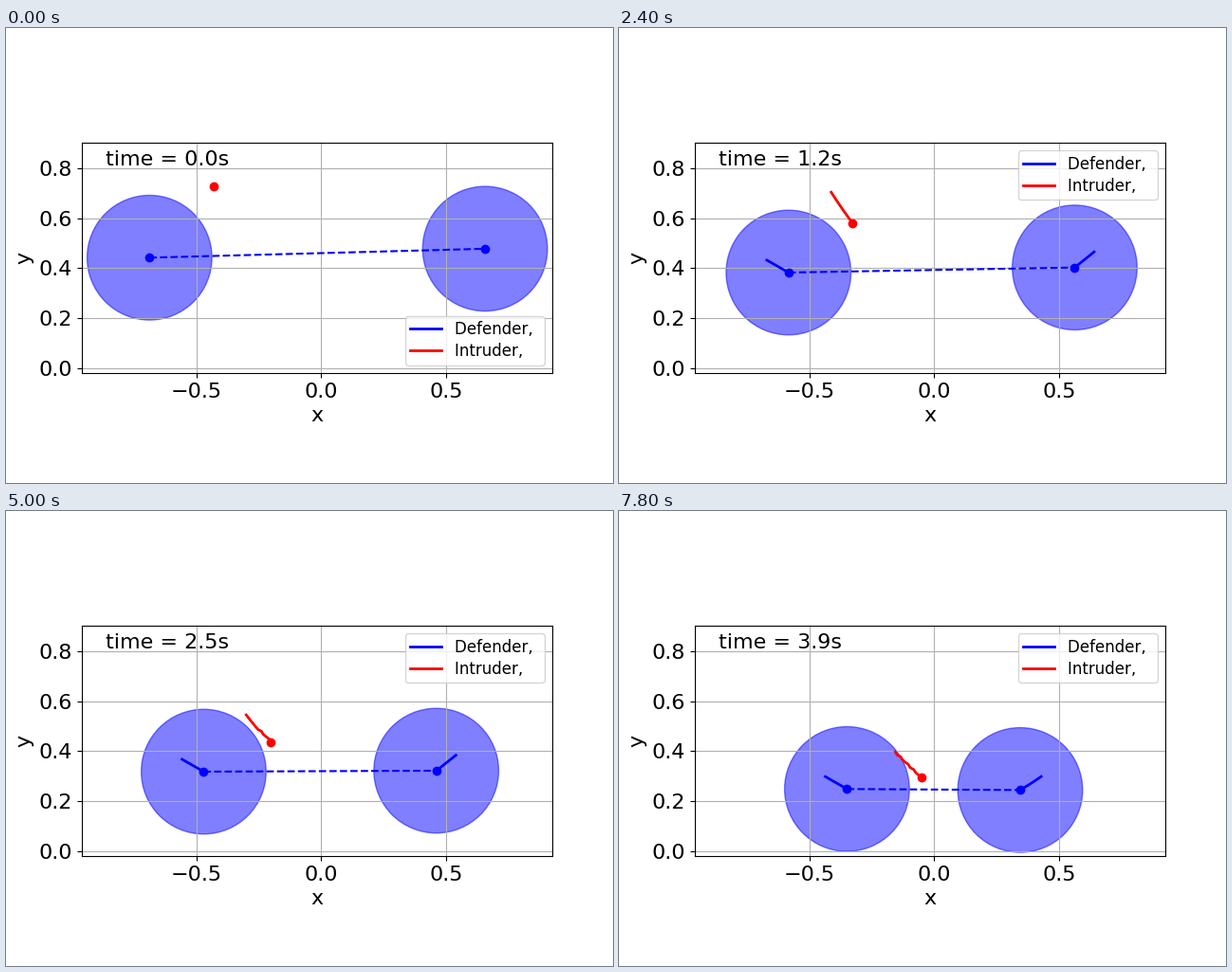
These frames come from a looping animation (640x480 px, 8000 ms). A matplotlib script:

```python
import numpy as np
import matplotlib.pyplot as plt
from matplotlib.animation import FuncAnimation
from matplotlib.lines import Line2D

FRAMES = 40
INTERVAL = 200
DT = 0.1
TAIL = 10
CONTACT = 20
RADIUS = 0.25

plt.rcParams["font.family"] = "DejaVu Sans"


def walk(start, speed, headings):
    """Positions reached from start with constant speed; headings in degrees."""
    a = np.radians(headings)
    steps = speed * DT * np.column_stack([np.cos(a), np.sin(a)])
    return np.vstack([start, start + np.cumsum(steps, axis=0)])


k = np.arange(FRAMES - 1)
late = np.maximum(0, k - CONTACT)
left = walk((-0.688, 0.4423), 0.1, np.full(len(k), -29.8))
right = walk((0.656, 0.478), 0.1, 180 + 38.8 - 0.45 * late)

# The intruder bends smoothly, then chatters along the edge of the disc
chatter = 44.2 - 18 * np.cos(2.5 * late)
intruder = walk((-0.429, 0.7302), 0.15,
                -np.where(k < CONTACT, 58 - 0.4 * k, chatter))

fig, ax = plt.subplots(figsize=(6.4, 4.8), dpi=100)
ax.set_aspect("equal")
ax.set_xlim(-0.959, 0.9255)
ax.set_ylim(-0.02, 0.9037)
ax.set_xticks([-0.5, 0, 0.5])
ax.set_yticks([0, 0.2, 0.4, 0.6, 0.8])
ax.tick_params(labelsize=16)
ax.set_xlabel("x", fontsize=16)
ax.set_ylabel("y", fontsize=16)
ax.grid(True)

agents = []
for path, color in ((left, "blue"), (right, "blue"), (intruder, "red")):
    trail, = ax.plot([], [], color=color, lw=2)
    dot, = ax.plot([], [], "o", color=color, ms=6)
    agents.append((path, trail, dot))

discs = [(path, ax.add_patch(plt.Circle(path[0], RADIUS, color="blue", alpha=0.5)))
         for path in (left, right)]
link, = ax.plot([], [], "--", color="blue", lw=1.5)
clock = ax.text(0.05, 0.9, "", fontsize=16, transform=ax.transAxes)
legend = ax.legend(
    handles=[Line2D([], [], color="blue", lw=2, label="Defender, \u200a"),
             Line2D([], [], color="red", lw=2, label="Intruder, ")],
    loc="lower right", fontsize=12, borderpad=0.32, labelspacing=0.3)


def legend_place(i):
    if i < 3:
        return "lower right"
    return "lower center" if i < 9 else "upper right"


def update(i):
    for path, trail, dot in agents:
        trail.set_data(*path[max(0, i - TAIL):i + 1].T)
        dot.set_data(*path[i:i + 1].T)
    for path, disc in discs:
        disc.center = path[i]
    link.set_data(*np.array([left[i], right[i]]).T)
    clock.set_text(f"time = {i * DT:.1f}s")
    legend.set_loc(legend_place(i))
    return []


anim = FuncAnimation(fig, update, frames=FRAMES, interval=INTERVAL,
                     init_func=lambda: update(0), repeat=True, repeat_delay=0)
plt.show()
```
